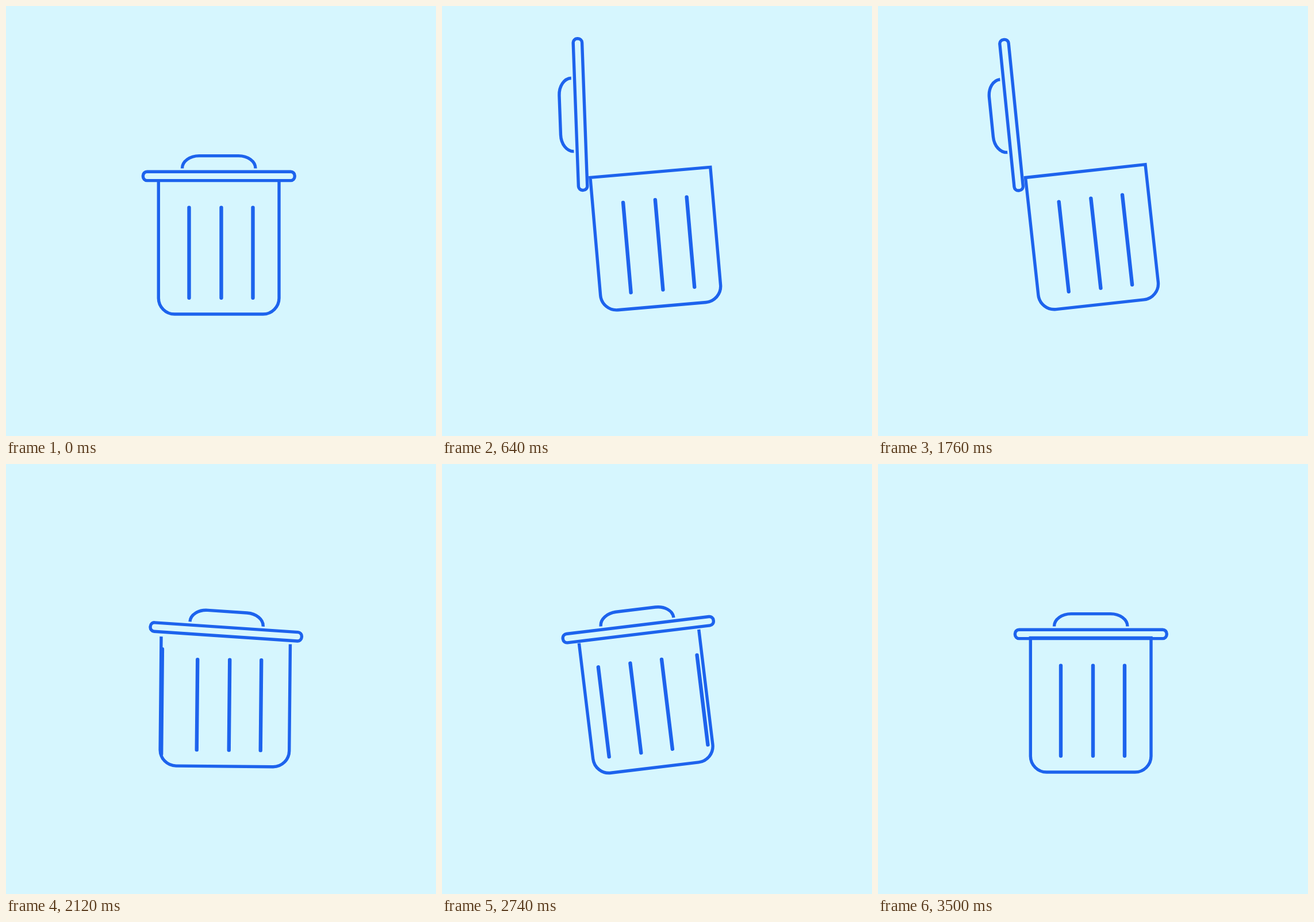
Write an HTML page that moves like this. It is 748 px wide and 748 px high and loops after 3820 ms.

```html
<!DOCTYPE html>
<html lang="en">
<head>
<meta charset="utf-8">
<title>Bin</title>
<style>
  html, body { margin: 0; width: 100%; height: 100%; overflow: hidden; background: #d6f6fe; }
  svg { display: block; width: 100vw; height: 100vh; }
  .line { fill: none; stroke: #1d63ed; stroke-width: 5.4; }
  .rib { fill: none; stroke: #1d63ed; stroke-width: 6.4; stroke-linecap: round; }
</style>
</head>
<body>
<svg viewBox="0 0 748 748">
  <defs>
    <clipPath id="inside"><rect id="window" y="302" height="234"/></clipPath>
  </defs>
  <g id="bin">
    <g id="lid">
      <rect class="line" x="238.4" y="288.2" width="263.8" height="15.4" rx="7"/>
      <path class="line" d="M306.5 282.5C306.5 270 320 260.6 336 260.6H404.5C420.5 260.6 434 270 434 282.5"/>
    </g>
    <g clip-path="url(#inside)">
      <path id="ribs" class="rib" d="M257 333V516M318.5 350.7V507.7M374.5 350.7V507.7M429.5 350.7V507.7M491.5 350.7V507.7"/>
    </g>
    <path id="body" class="line"/>
  </g>
</svg>
<script>
const LOOP = 3820, STEP = 20, LAST = 3500;
const MID = 370.15, FLOOR = 536, TOP = 302.4, HALF = 104.85, RADIUS = 28;

const $ = id => document.getElementById(id);
const bin = $('bin'), lid = $('lid'), ribs = $('ribs'), body = $('body'), pane = $('window');

// Progress from 0 to 1 between two times, and its eased forms.
const ramp = (t, from, to) => Math.min(1, Math.max(0, (t - from) / (to - from)));
const smooth = u => u < 0.5 ? 2 * u * u : 1 - 2 * (1 - u) ** 2;
const ease = (t, from, to) => smooth(ramp(t, from, to));
const arc = (t, from, to) => Math.sin(Math.PI * ramp(t, from, to));

// Eased swing through [time, value] turning points.
function swing(t, points) {
  let value = points[0][1];
  for (let i = 1; i < points.length; i++) {
    const [from, a] = points[i - 1], [to, b] = points[i];
    value += (b - a) * ease(t, from, to);
  }
  return value;
}

function pose(t) {
  const lean = ease(t, 20, 1120) - ease(t, 1480, 2324);
  const rock = swing(t, [[2020, 0], [2280, 5], [2720, -7], [3000, 3], [3240, 0]]);
  const sway = Math.abs(rock);
  const bulge = arc(t, 2000, 2240) ** 2;
  const slam = 104.1 * ramp(t, 1276, 2120) ** 4 - 3.3 * ease(t, 2120, 2200);
  return {
    tilt: rock - 8 * lean,
    x: 20 * (ease(t, 20, 1120) - ramp(t, 1520, 2720)),
    y: -20.4 * lean ** 0.8 - 1.15 * sway - 10 * arc(t, 2060, 2440),
    lid: slam - 100.8 * ease(t, 20, 858),
    lift: -0.22 * sway,
    half: HALF + 7.45 * bulge,
    left: 304 + 7 * bulge + 0.2 * sway,
    right: 304 + 18 * bulge + 0.4 * sway,
    slide: swing(t, [[2060, 0], [2280, 20], [2720, -25], [3450, -0.5]]),
    closed: (t >= 20 && t < 2040) || t >= 3220
  };
}

function outline({ half, left, right, closed }) {
  const l = MID - half, r = MID + half, b = FLOOR - RADIUS;
  const corner = `A${RADIUS} ${RADIUS} 0 0 0 `;
  return `M${l} ${closed ? TOP : left}V${b}${corner}${l + RADIUS} ${FLOOR}H${r - RADIUS}`
    + `${corner}${r} ${b}V${closed ? TOP : right}${closed ? 'Z' : ''}`;
}

function draw(t) {
  const p = pose(t);
  bin.setAttribute('transform', `translate(${p.x} ${p.y}) rotate(${p.tilt} ${MID} ${FLOOR})`);
  lid.setAttribute('transform', `translate(0 ${p.lift}) rotate(${p.lid} 259 303)`);
  ribs.setAttribute('transform', `translate(${p.slide} 0)`);
  pane.setAttribute('x', MID - p.half);
  pane.setAttribute('width', 2 * p.half);
  body.setAttribute('d', outline(p));
}

const start = performance.now();
function tick() {
  const t = (performance.now() - start) % LOOP;
  draw(Math.min(LAST, Math.floor(t / STEP) * STEP));
  requestAnimationFrame(tick);
}
tick();
</script>
</body>
</html>
```
